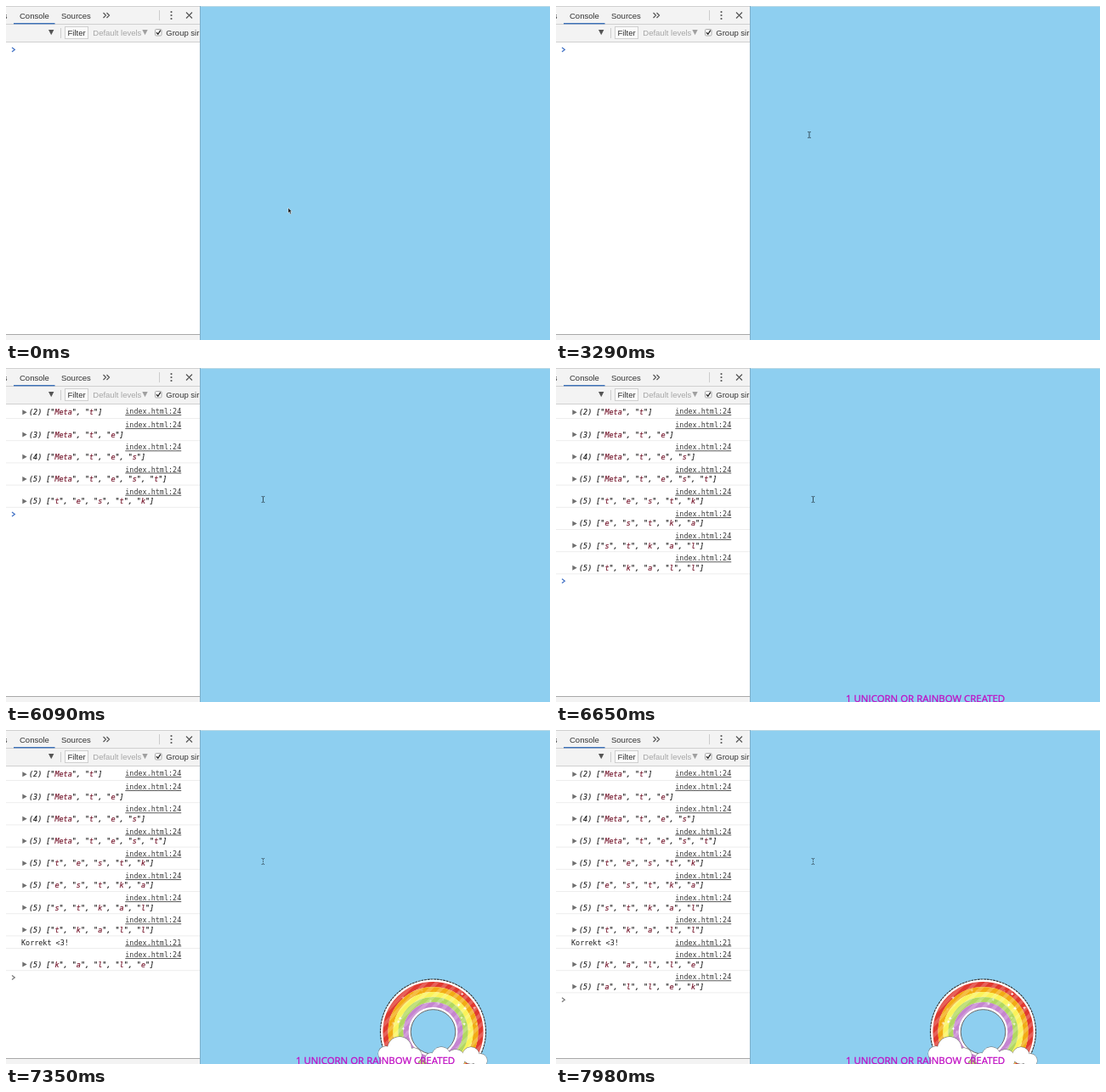
Animation of 640 by 394 pixels, one loop 8 s. Source, as an HTML page:

```html
<!DOCTYPE html>
<html lang="en">
<head>
<meta charset="utf-8">
<title>Console key log</title>
<style>
  html, body { margin: 0; width: 100%; height: 100%; overflow: hidden; }
  svg { display: block; width: 100vw; height: 100vh; }
  text { white-space: pre; }
  .ui { font: 9.5px "Liberation Sans", Arial, sans-serif; fill: #333; }
  .mono { font: 8.43px "DejaVu Sans Mono", monospace; fill: #1c1c1c; }
  .italic { font-style: italic; stroke: #1c1c1c; stroke-width: .15; }
  .str { fill: #74142a; stroke: #74142a; }
  .link { fill: #3a3a3a; text-decoration: underline; }
  .banner { font: 11.44px "Open Sans", sans-serif; fill: #c010c4; stroke: #c010c4; stroke-width: .3; }
</style>
</head>
<body>
<svg viewBox="0 0 640 394">
  <defs>
    <pattern id="stripes" width="9" height="9" patternUnits="userSpaceOnUse" patternTransform="rotate(45)">
      <rect width="4" height="9" fill="#fff" opacity=".2"/>
    </pattern>
  </defs>

  <rect width="640" height="394" fill="#8ecff0"/>
  <rect x="228" width="412" height="1" fill="#bcd9e6"/>

  <g id="prize">
    <g id="bands" fill="none"></g>
    <g id="clouds"></g>
    <g id="sparkles" fill="#fff"></g>
  </g>
  <text id="banner" class="banner" x="341" y="393.5">1 UNICORN OR RAINBOW CREATED</text>

  <rect width="228" height="394" fill="#fff"/>
  <rect width="228" height="42" fill="#f3f3f3"/>
  <path d="M0 .5H228M0 21.5H228M0 42.5H228" stroke="#d0d0d0"/>
  <rect y="388" width="228" height="6" fill="#f3f3f3"/>
  <path d="M0 387.5H228" stroke="#a8a8a8"/>
  <path d="M228.5 0V394" stroke="#7fb0ca"/>

  <g class="ui">
    <text x="-3.2" y="15">s</text>
    <text x="16" y="15">Console</text>
    <text x="65" y="15">Sources</text>
    <rect x="9" y="20" width="48.5" height="1.4" fill="#3b70b8"/>
    <path d="M114.5 8l3 3-3 3M118.5 8l3 3-3 3M212 7.5l7 7M219 7.5l-7 7" fill="none" stroke="#555" stroke-width="1.2"/>
    <path d="M180.5 5V17M64.5 26V38" stroke="#ccc"/>
    <g fill="#555"><circle cx="194.5" cy="7" r="1.1"/><circle cx="194.5" cy="11" r="1.1"/><circle cx="194.5" cy="15" r="1.1"/></g>
    <path d="M50 28h6.4l-3.2 6.2z" fill="#555"/>
    <rect x="69.5" y="24.5" width="27" height="14" fill="#fafafa" stroke="#d0d0d0"/>
    <text x="72.5" y="35">Filter</text>
    <text x="102.3" y="35" fill="#a5a5a5">Default levels</text>
    <path d="M160.3 28h6.4l-3.2 6.2z" fill="#a0a0a0"/>
    <rect x="175.5" y="27.5" width="7.5" height="7.5" rx="1.2" fill="#fafafa" stroke="#aaa"/>
    <path d="M177 31.3l1.8 2 3-4.6" fill="none" stroke="#222" stroke-width="1.3"/>
    <text x="188.3" y="35">Group sir</text>
  </g>

  <g id="log"></g>
  <path id="prompt" d="M7 -2.5l3.3 2.5-3.3 2.5" fill="none" stroke-width="1.2"/>
  <g id="cursor">
    <path id="arrow" d="M0 0V6.2L1.4 5l1.2 2.5 1.1-.5L2.6 4.6H4.3z" fill="#111" stroke="#fff" stroke-width=".5"/>
    <path id="beam" d="M-1.8 -3.4h1.3l.5.5.5-.5h1.3M0 -2.9V2.9M-1.8 3.4h1.3l.5-.5.5.5h1.3" fill="none" stroke="#35505e"/>
  </g>
</svg>

<script>
const LOOP = 8000, STEP = 70;
const BANNER_AT = 6580, PRIZE_AT = 6860, BEAM_AT = 910;
const $ = id => document.getElementById(id);

// [time, pressed keys]; a row without keys is a plain message
const entries = [
  [3920, 'Meta t'], [4270, 'Meta t e'], [4620, 'Meta t e s'], [5040, 'Meta t e s t'],
  [6090, 't e s t k'], [6230, 'e s t k a'], [6300, 's t k a l'], [6510, 't k a l l'],
  [6720, null], [6720, 'k a l l e'], [7630, 'a l l e k']
];

const cursorPath = [
  [0, 332, 238], [70, 335, 224], [140, 337, 215], [420, 337, 215], [630, 331, 211],
  [840, 331, 211], [910, 330, 211], [2940, 330, 211], [3080, 323, 196], [3220, 308, 169],
  [3290, 298, 152], [3360, 298, 151], [3430, 302.5, 155]
];

function buildLog() {
  let top = 42.6;
  return entries.map(([time, keys], i) => {
    const height = !keys ? 14.6 : i ? 26.2 : 17.1;
    const textY = top + (!keys ? 11 : i ? 21.9 : 12.6);
    const linkY = top + (i ? 10.5 : 11.5);
    const row = document.createElementNS('http://www.w3.org/2000/svg', 'g');
    let body = `<text class="mono" x="18" y="${textY}">Korrekt &lt;3!</text>`;
    if (keys) {
      const list = keys.split(' ');
      const items = list.map(k => `"<tspan class="str">${k}</tspan>"`).join(', ');
      body = `<path d="M19.3 ${textY - 6}l5.4 3-5.4 3z" fill="#6e6e6e"/>
        <text class="mono italic" x="27" y="${textY}">(${list.length}) [${items}]</text>`;
    }
    top += height;
    row.innerHTML = `${body}
      <text class="mono link" x="140.3" y="${linkY}">index.html:${keys ? 24 : 21}</text>
      <path d="M0 ${top - .2}H228" stroke="#ededed"/>`;
    $('log').append(row);
    return { time, row, bottom: top };
  });
}

function buildRainbow() {
  const cx = 502.5, cy = 356;
  const ring = (r, color, width, extra = '') =>
    `<circle cx="${cx}" cy="${cy}" r="${r}" stroke="${color}" stroke-width="${width}" ${extra}/>`;
  const colors = ['#e0392f', '#f2ab14', '#faf35a', '#b2d860', '#c585cf'];
  $('bands').innerHTML = ring(44, '#fff', 36) + ring(62, '#333', 1.1, 'stroke-dasharray="3 .7"') +
    ring(26.3, '#555', .9) +
    colors.map((color, i) => ring(56 - i * 6, color, 6.2)).join('') +
    ring(44, 'url(#stripes)', 30);

  const puffs = [
    [463, 376, 14], [447, 382, 9], [480, 384, 9], [463, 394, 22],
    [512, 385, 11], [500, 388, 7], [529, 388, 11], [547, 384, 10], [558, 390, 8]
  ];
  const layer = (grow, fill) =>
    puffs.map(([x, y, r]) => `<circle cx="${x}" cy="${y}" r="${r + grow}" fill="${fill}"/>`).join('');
  $('clouds').innerHTML = layer(.4, '#666') + layer(0, '#fff');

  $('sparkles').innerHTML = Array.from({ length: 30 }, (_, i) => {
    const angle = Math.PI * (1 + (i * .618) % 1), r = 31 + (i * i * 3.7) % 27;
    const x = cx + r * Math.cos(angle), y = cy + r * Math.sin(angle);
    return `<path d="M${x} ${y - 2.2}l.6 1.6 1.6.6-1.6.6-.6 1.6-.6-1.6-1.6-.6 1.6-.6z"/>`;
  }).join('');
}

function cursorAt(t) {
  const next = cursorPath.findIndex(p => p[0] > t);
  if (next < 0) return cursorPath.at(-1).slice(1);
  const [t0, x0, y0] = cursorPath[next - 1], [t1, x1, y1] = cursorPath[next];
  const k = (t - t0) / (t1 - t0);
  return [x0 + (x1 - x0) * k, y0 + (y1 - y0) * k];
}

const show = (el, on) => el.setAttribute('visibility', on ? 'visible' : 'hidden');

const rows = buildLog();
buildRainbow();

function draw(now) {
  const t = Math.floor(now % LOOP / STEP) * STEP;

  let promptY = 51.5;
  for (const { time, row, bottom } of rows) {
    show(row, t >= time);
    if (t >= time) promptY = bottom + 8.1;
  }
  const prize = t >= PRIZE_AT;
  $('prompt').setAttribute('transform', `translate(0 ${promptY})`);
  $('prompt').setAttribute('stroke', prize ? '#777' : '#3f6fc4');

  show($('banner'), t >= BANNER_AT);
  show($('prize'), prize);
  [...$('sparkles').children].forEach((sparkle, i) =>
    sparkle.setAttribute('opacity', (.5 + .5 * Math.sin(t / 110 + i * i * 1.7)).toFixed(2)));

  $('cursor').setAttribute('transform', `translate(${cursorAt(t)})`);
  show($('arrow'), t < BEAM_AT);
  show($('beam'), t >= BEAM_AT);
  $('beam').setAttribute('stroke-dasharray', prize ? '1.4 1' : 'none');
}

function frame() {
  draw(performance.now());
  requestAnimationFrame(frame);
}
frame();
</script>
</body>
</html>
```
